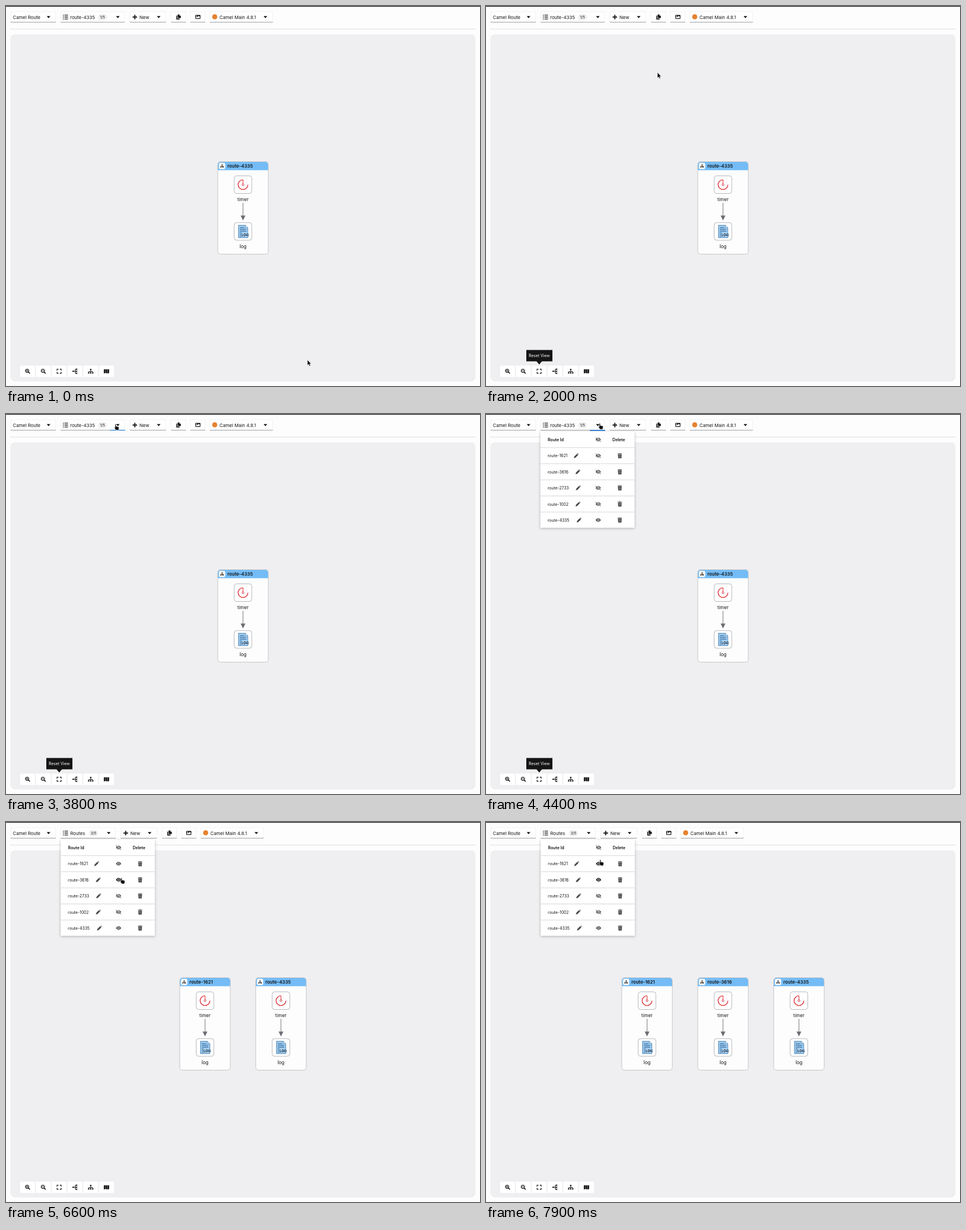
Write an HTML page that moves like this. It is 835 px wide and 670 px high and loops after 8 s.

```html
<!DOCTYPE html>
<html lang="en">
<head>
<meta charset="utf-8">
<title>Route list</title>
<style>
  html, body { margin: 0; width: 100%; height: 100%; overflow: hidden; background: #fdfdfd; }
  svg { display: block; width: 835px; height: 670px; }
  text { font-family: Inter, "Open Sans", sans-serif; fill: #151515; }
  #menu { filter: drop-shadow(0 1px 2px rgba(0, 0, 0, .28)); }
</style>
</head>
<body>
<svg id="stage" viewBox="0 0 835 670" xmlns="http://www.w3.org/2000/svg"></svg>
<script>
const LOOP = 8000, STEP = 100;
const $ = id => document.getElementById(id);

// ---------- drawing helpers ----------
const rect = (x, y, w, h, fill, more = '') =>
  `<rect x="${x}" y="${y}" width="${w}" height="${h}" fill="${fill}" ${more}/>`;
const path = (d, more = 'fill="#151515"') => `<path d="${d}" ${more}/>`;
const line = (d, color = '#151515', w = 1.3) =>
  path(d, `fill="none" stroke="${color}" stroke-width="${w}"`);
const at = (x, y, body, more = '') => `<g transform="translate(${x} ${y})" ${more}>${body}</g>`;
const group = (id, body) => `<g id="${id}">${body}</g>`;
// y is the middle of the line of text
const text = (x, y, s, size = 8.1, more = '') =>
  `<text x="${x}" y="${y + size * .36}" font-size="${size}" ${more}>${s}</text>`;
const MID = 'text-anchor="middle"';
const BOLD = 'font-weight="600"';

// ---------- icons, each centred on 0,0 ----------
const icon = {
  caret: path('M-3.2 -1.7H3.2L0 1.9z'),
  plus: line('M-4 0H4M0 -4V4', '#151515', 1.8),
  list: line('M-4.5 -3.4h1.7M-4.5 0h1.7M-4.5 3.4h1.7M-1.6 -3.4H4.6M-1.6 0H4.6M-1.6 3.4H4.6', '#151515', 1.4),
  copy: path('M-4 -2.2h1.5V2.8H1.8V4.4H-4z') + path('M-1.6 -4.4H1.7V-2H4V2H-1.6z'),
  image: rect(-4.5, -3.5, 9, 7, '#151515', 'rx="1"') +
    path('M-3.4 2.2V.7L-1.8 -.9 -.6 .3 1.7 -2 3.4 -.2V2.2z', 'fill="#fff"') +
    '<circle cx="-2.3" cy="-1.6" r=".9" fill="#fff"/>',
  zoomIn: lens(true),
  zoomOut: lens(false),
  expand: line('M-3.6 -1.2V-3.6H-1.2M1.2 -3.6H3.6V-1.2M3.6 1.2V3.6H1.2M-1.2 3.6H-3.6V1.2'),
  tree: tree(),
  treeSide: `<g transform="rotate(-90)">${tree()}</g>`,
  book: path('M-4.6 -3.2 -1.9 -3.8V3.2L-4.6 3.8zM-1.5 -3.8 1.5 -3.2V3.8L-1.5 3.2zM1.9 -3.2 4.6 -3.8V3.2L1.9 3.8z'),
  pencil: path('M-4.2 4.2 -3.5 1.4 1.2 -3.3 3.3 -1.2 -1.4 3.5zM1.8 -3.9 2.6 -4.5 4.4 -2.7 3.9 -1.8z', 'fill="#45484c"'),
  trash: path('M-3.8 -4H-1.3L-.8 -4.6H.8L1.3 -4H3.8V-2.9H-3.8zM-3.3 -2.3H3.3L2.9 4.5H-2.9z', 'fill="#45484c"') +
    line('M-1.4 -1V3.3M0 -1V3.3M1.4 -1V3.3', '#a5a7aa', .5),
  eye: c => path('M-4.6 0Q-2.6 -3.3 0 -3.3T4.6 0Q2.6 3.3 0 3.3T-4.6 0z', `fill="${c}"`) +
    '<circle r="2.1" fill="#fff"/>' + `<circle r="1.3" fill="${c}"/>`,
  eyeOff: c => icon.eye(c) + line('M-4.6 -4.2 4.1 3.2', '#fff', 1.3) + line('M-4.6 -3.5 4.6 3.8', c, 1)
};

function lens(plus) {
  return '<circle cx="-.8" cy="-.8" r="2.9" fill="none" stroke="#151515" stroke-width="1.3"/>' +
    line('M1.4 1.4 4 4', '#151515', 1.7) +
    line('M-2.3 -.8H.7' + (plus ? 'M-.8 -2.3V.7' : ''), '#151515', .9);
}

function tree() {
  return line('M0 -3V3M-3.6 2.5V.6H3.6V2.5', '#151515', 1) +
    rect(-1.2, -4.2, 2.4, 2.2, '#151515') +
    [-3.6, 0, 3.6].map(x => rect(x - 1.1, 2, 2.2, 2.1, '#151515')).join('');
}

// ---------- parts ----------
const button = (x, w) =>
  rect(x + .5, 10, w - 1, 18.5, '#fff', 'stroke="#f2f2f2"') + rect(x, 28, w, 1, '#9a9da0');

const badge = (x, s) => rect(x - 8, 14.2, 16, 10.8, '#f0f0f0', 'rx="5.4"') + text(x, 19.7, s, 6.5, MID);

function timerIcon() {
  return line('M0 -8.6A8.6 8.6 0 1 0 8.6 0', '#e1343c', 1.4) +
    line('M0 -8.6V-1.5', '#e1343c', 1.1) +
    '<circle r="1.7" fill="#fff" stroke="#c9323a" stroke-width="1"/>' +
    line('M3.3 -7.2 4 -6.6M6.4 -4 6.9 -3.1', '#d9a3a5', .8);
}

function logIcon() {
  return path('M-8 -11H4L8.5 -6.5V11H-8z', 'fill="#9cc8ea" stroke="#3c78ae" stroke-width=".8"') +
    path('M4 -11V-6.5H8.5z', 'fill="#e3f1fb" stroke="#3c78ae" stroke-width=".6"') +
    line('M-5.5 -6.5H2M-5.5 -3.5H5.5M-5.5 -.5H5.5M-5.5 2.5H-2.5M-5.5 5.5H-3M-5.5 8.5H-3', '#255f97', 1.2) +
    rect(-2.8, 2.6, 13, 7, '#b7d9f3') +
    text(3.7, 6.2, 'LOG', 6, MID + ' font-weight="800" style="fill:#12304f"');
}

function card(cx, name) {
  const node = (y, art) =>
    rect(-15.5, y - 15.5, 31, 31, '#fff', 'rx="4" stroke="#b4b6b8"') + at(0, y, art);
  return at(cx, 0,
    rect(-44.5, 274.5, 89, 163, '#fdfdfd', 'rx="5"') +
    path('M-44.5 289.5V279.5a5 5 0 0 1 5 -5H39.5a5 5 0 0 1 5 5V289.5z', 'fill="#73bcf7"') +
    rect(-44.5, 274.5, 89, 163, 'none', 'rx="5" stroke="#c3c5c8"') +
    rect(-42.3, 276.5, 11, 11, '#fff', 'rx="2.5"') +
    at(-36.8, 282, `<g transform="scale(.7)">${icon.tree}</g>`) +
    text(-27.5, 282, name, 8.1, BOLD) +
    node(315, timerIcon()) + text(0, 341, 'timer', 8.2, MID) +
    line('M0 347V371', '#8a8d90', 1.2) + path('M-4.2 369.5H4.2L0 378z', 'fill="#6a6e73"') +
    node(397.5, logIcon()) + text(0, 423.7, 'log', 8.4, MID));
}

const cards = names => names.map((n, i) =>
  card(417.5 + (i - (names.length - 1) / 2) * 133.8, n)).join('');

const ROUTES = ['route-1621', 'route-3616', 'route-2733', 'route-1002', 'route-4335'];
const PENCIL_X = [159, 162, 162.5, 162, 164];
const rowY = i => 73.5 + i * 28.4;

function menu() {
  const rows = ROUTES.map((name, i) =>
    rect(96, rowY(i) - 14.7, 165.5, 1, '#d6d6d8') +
    text(108.5, rowY(i) + .3, name, 7.1) +
    at(PENCIL_X[i], rowY(i), icon.pencil) +
    at(235.7, rowY(i), icon.trash)).join('');
  return rect(95.7, 31, 166, 169.7, '#fff') +
    text(108.7, 45, 'Route Id', 7.2, BOLD) +
    at(197.7, 45, icon.eyeOff('#45484c')) +
    text(222.7, 45, 'Delete', 7.2, BOLD) + rows + group('eyes', '');
}

const controls = ['zoomIn', 'zoomOut', 'expand', 'treeSide', 'tree', 'book'].map((k, i) =>
  at(38 + i * 27.8, 644, rect(-13, -10, 26, 20, '#fff') + icon[k])).join('');

const tools =
  button(218, 64) + at(227, 19.5, icon.plus) + text(235, 19.7, 'New') + at(269, 19.5, icon.caret) +
  button(291, 26) + at(304, 19.3, icon.copy) +
  button(325, 26) + at(338, 19.3, icon.image) +
  button(359, 111) + '<circle cx="367.7" cy="19" r="4.5" fill="#e8822e"/>' +
  text(376, 19.7, 'Camel Main 4.8.1') + at(457, 19.5, icon.caret);

$('stage').innerHTML =
  rect(0, 0, 835, 670, '#fdfdfd') + rect(0, 0, 835, 1.2, '#151515') +
  rect(8, 40, 819, 1, '#dedee0') +
  rect(8, 50, 819, 612, '#efeef0', 'rx="8"') +
  button(8, 80) + text(12, 19.7, 'Camel Route') + at(75, 19.5, icon.caret) +
  group('picker', '') + group('tools', tools) + group('cards', '') + controls +
  rect(96, 28, 87, 1.2, '#2b8fd6', 'id="lineA"') +
  rect(183, 28, 27, 1.2, '#0066cc', 'id="lineB"') +
  group('tip', path('M71 606.5H117V626.5H98.5L93.7 632 89 626.5H71z') +
    text(93.8, 616.8, 'Reset View', 7.1, MID + ' style="fill:#fff"')) +
  group('menu', menu()) +
  group('hint', rect(144, 33, 54, 24.5, '#1f1f1f', 'rx="1"') +
    text(171, 45.2, 'route-4335', 7.2, MID + ' style="fill:#e4e4e4"')) +
  group('arrow', path('M0 0V9.6L2.2 7.6 3.7 10.9 5.4 10.1 3.9 6.9H6.7z',
    'fill="#111" stroke="#fff" stroke-width=".5"')) +
  group('hand', path('M2.2 .4C3 .4 3.3 .9 3.3 1.6V4.3L7.2 5.1C8 5.3 8.4 5.9 8.3 6.7L7.6 11H3.2L.5 7.7C-.1 6.9 .7 6 1.5 6.5V1.6C1.5 .9 1.6 .4 2.2 .4z',
    'fill="#111" stroke="#fff" stroke-width=".5"'));

// ---------- timeline ----------
const TRACK = [ // ms, x, y
  [0, 531, 624], [900, 541, 502], [1000, 548, 420], [1100, 551, 339], [1300, 500, 255],
  [1500, 446, 208], [1800, 446, 208], [2100, 230, 72], [2300, 143, 20], [3200, 143, 20],
  [3700, 187, 18], [4000, 198, 16], [4800, 198, 16], [5100, 199, 50], [5400, 197, 70],
  [6100, 197, 70], [6400, 200, 90], [6600, 201, 98], [7600, 201, 98], [7900, 199, 66], [8000, 199, 66]
];

function pointer(t) {
  const i = TRACK.findIndex((k, n) => n && t <= k[0]);
  const [t0, x0, y0] = TRACK[i - 1], [t1, x1, y1] = TRACK[i];
  const p = (t - t0) / (t1 - t0);
  return [x0 + (x1 - x0) * p, y0 + (y1 - y0) * p];
}

const within = (t, a, b) => t >= a && t < b;
const show = (id, on) => $(id).setAttribute('display', on ? 'inline' : 'none');
const move = (id, x, y) => $(id).setAttribute('transform', `translate(${x} ${y})`);

function draw(t) {
  const many = t >= 5500;
  const open = t >= 4400;
  const dx = many ? -16 : 0;

  $('picker').innerHTML = button(96, 113 + dx) + at(104.7, 19.5, icon.list) +
    text(113, 19.7, many ? 'Routes' : 'route-4335') +
    badge(170 + dx, !many ? '1/5' : t < 6600 ? '2/5' : '3/5') + at(197 + dx, 19.5, icon.caret);
  move('tools', dx, 0);
  $('cards').innerHTML = cards(ROUTES.filter((n, i) =>
    i === 4 || (i === 0 && many) || (i === 1 && t >= 6700)));

  const seen = [many, t >= 6600, false, false, true];
  const dark = [within(t, 5300, 6500) || t >= 7800, t >= 6500];
  $('eyes').innerHTML = seen.map((on, i) =>
    at(197.7, rowY(i), icon[on ? 'eye' : 'eyeOff'](dark[i] ? '#151515' : '#45484c'))).join('');
  show('menu', open);
  move('menu', many ? .6 : 0, 0);

  show('tip', within(t, 500, 4600));
  show('hint', within(t, 2900, 3500));
  show('lineA', within(t, 2300, 3700));
  show('lineB', within(t, 3700, 5000));
  $('lineB').setAttribute('height', t < 4200 ? 1 : 1.6);

  const hand = t >= 2300;
  show('arrow', !hand);
  show('hand', hand);
  move(hand ? 'hand' : 'arrow', ...pointer(t));
}

let start = null, last = -1;
function tick(now) {
  if (start === null) start = now;
  const t = Math.floor((now - start) % LOOP / STEP) * STEP;
  if (t !== last) draw(last = t);
  requestAnimationFrame(tick);
}
draw(0);
requestAnimationFrame(tick);
</script>
</body>
</html>
```
